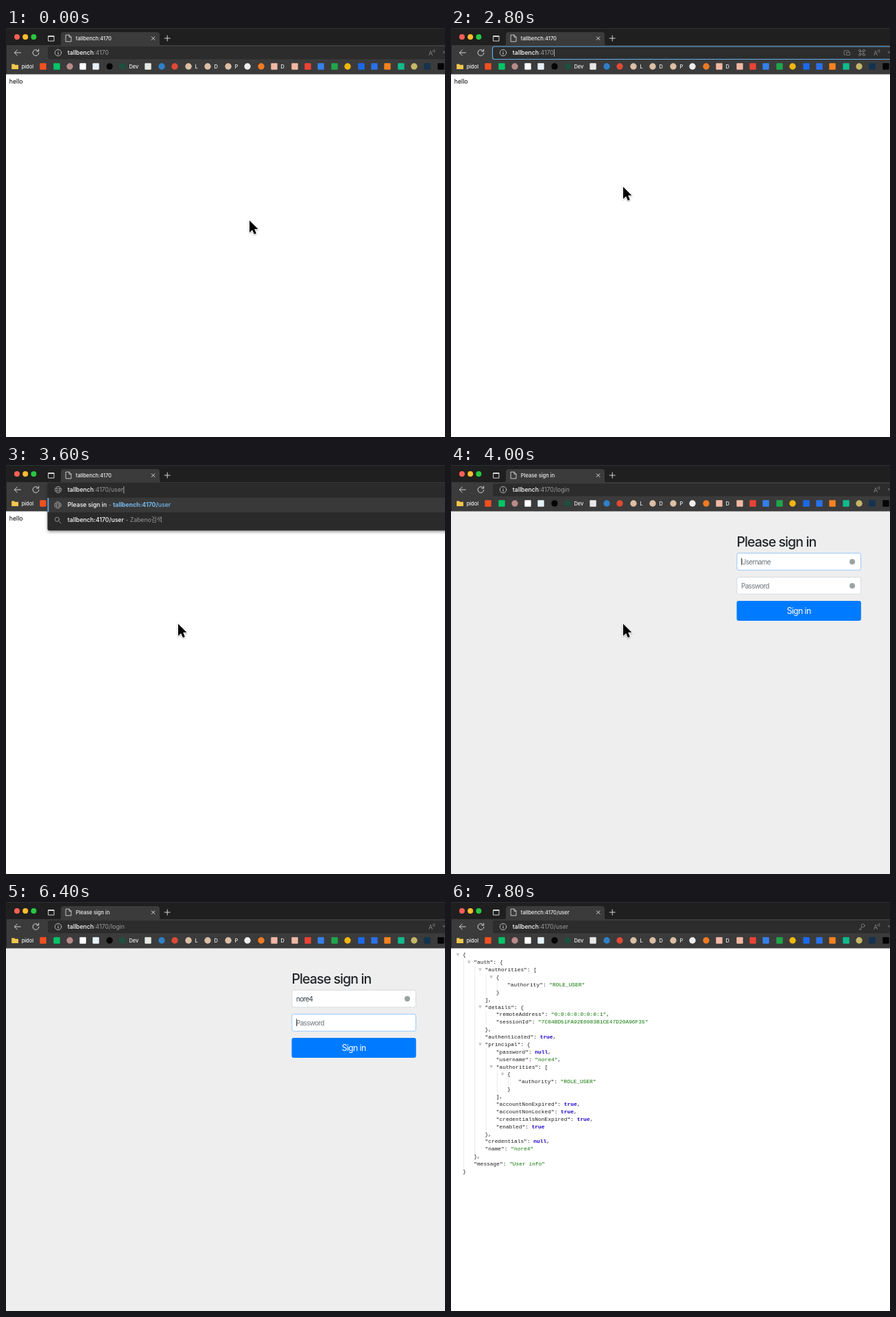
An HTML page for the animation above (8000 ms loop, 640 by 596 pixels).

```html
<!DOCTYPE html>
<html lang="en">
<head>
<meta charset="utf-8">
<title>Sign-in flow</title>
<style>
  html, body { margin: 0; width: 100%; height: 100%; overflow: hidden; background: #fff; }
  svg { display: block; width: 640px; height: 596px; font-family: Inter, "Noto Sans CJK KR", "Noto Sans CJK", sans-serif; }
  .line { fill: none; stroke: #d6d6d6; stroke-width: 1; stroke-linecap: round; stroke-linejoin: round; }
  .dim { stroke: #858585; stroke-width: .8; }
  .tab { font-size: 7.5px; font-weight: 500; fill: #f0f0f0; }
  .mark { font-size: 7.4px; font-weight: 500; fill: #f2f2f2; }
  .url { font-size: 8.7px; fill: #9c9c9c; }
  .url .host, .row { fill: #fff; }
  .url .host { font-weight: 500; }
  .row { font-size: 8.7px; font-weight: 500; }
  .row .dash { fill: #9a9a9a; font-weight: 400; }
  .row .link { fill: #76b9ed; }
  .row .b { font-weight: 700; }
  .form { letter-spacing: -.04em; }
  .field { font-size: 9.9px; fill: #343a40; }
  .field.empty { fill: #6c757d; }
  .box { fill: #fff; stroke: #ced4da; stroke-width: .8; }
  .json { font: 7.86px "Liberation Mono", monospace; fill: #1c1c1c; }
  .json .str { fill: #0b7500; }
  .json .key { fill: #1a01cc; font-weight: 700; }
  .guide { stroke: #c4c4c4; stroke-width: .7; stroke-dasharray: 1 1; }
</style>
</head>
<body>
<svg viewBox="0 0 640 596">
  <defs>
    <g id="globe" class="line" style="stroke:#a0a0a0;stroke-width:.75">
      <circle r="4.7"/><ellipse rx="2.1" ry="4.7"/><path d="M-4.4-1.6H4.4M-4.4 1.6H4.4"/>
    </g>
    <g id="lens" class="line" style="stroke:#a0a0a0;stroke-width:.9">
      <circle cx="-1" cy="-1" r="3.1"/><path d="M1.3 1.3L4.6 4.6"/>
    </g>
    <filter id="soft" x="-5%" y="-10%" width="110%" height="130%">
      <feDropShadow dx="0" dy="2" stdDeviation="2" flood-opacity=".4"/>
    </filter>
    <filter id="lift" x="-50%" y="-50%" width="200%" height="200%">
      <feDropShadow dx="0" dy="1" stdDeviation="1" flood-opacity=".35"/>
    </filter>
  </defs>

  <!-- pages -->
  <rect width="640" height="596" fill="#fff"/>
  <text data-on="0-4000" x="4.7" y="80.5" font-size="8.8">hello</text>

  <g class="form" data-on="4000-7600">
    <rect y="67" width="640" height="529" fill="#eee"/>
    <text x="416.5" y="119" font-size="19.5" font-weight="500" fill="#212529" letter-spacing="-.9">Please sign in</text>
    <rect id="nameBox" class="box" x="416.9" y="128.4" width="180.6" height="24.8" rx="2.5"/>
    <rect id="passBox" class="box" x="416.9" y="163.4" width="180.6" height="24.8" rx="2.5"/>
    <text id="name" class="field" x="423" y="144.6"></text>
    <text id="pass" class="field" x="423" y="179.5"></text>
    <circle cx="585" cy="141" r="4" fill="#9aa3a3"/>
    <circle data-on="4000-6200" cx="585" cy="176" r="4" fill="#9aa3a3"/>
    <rect x="416.5" y="198" width="181.3" height="29" rx="3" fill="#007bff"/>
    <text x="507" y="217" font-size="12.4" fill="#fff" text-anchor="middle">Sign in</text>
    <rect id="fieldCaret" width=".7" height="11" fill="#222"/>
  </g>

  <g id="json" class="json" data-on="7600-8000"></g>

  <!-- browser frame -->
  <rect width="640" height="26" fill="#1f1f1f"/>
  <rect width="640" height="1" fill="#2a2f35"/>
  <rect y="25" width="640" height="42.5" fill="#3b3b3b"/>
  <rect width="1" height="67" fill="#242424"/>
  <path d="M77 25.5Q80 25.5 80 22V10Q80 6 84 6H220Q224 6 224 10V22Q224 25.5 227 25.5Z" fill="#3b3b3b"/>
  <circle cx="16" cy="13" r="4" fill="#fe5f57"/>
  <circle cx="28.2" cy="13" r="4" fill="#febc2e"/>
  <circle cx="40.4" cy="13" r="4" fill="#28c840"/>
  <path class="line" d="M62 11.5H70V19H62ZM62 12.5H70"/>
  <path id="page" class="line" style="stroke-width:.9" d="M87.5 10.2H92L95 13.2V19.8H87.5ZM92 10.2V13.2H95"/>
  <path id="spin" class="line" style="stroke:#6cb4f0;stroke-width:1.2" d="M0-4A4 4 0 1 1-4 0"/>
  <text id="title" class="tab" x="101.8" y="17.6"></text>
  <path class="line" d="M212.3 12.8L216.9 17.4M216.9 12.8L212.3 17.4M231.2 15H239.2M235.2 11V19"/>
  <path class="line" d="M21.3 36H12.5M16.3 32L12.3 36L16.3 40"/>
  <path id="reload" class="line" d="M47.2 33.6A4.4 4.4 0 1 0 47.9 36.4M47.7 31V34H44.7"/>
  <path id="stop" class="line" d="M40 32.5L47 39.5M47 32.5L40 39.5"/>
  <g id="marks" class="mark"></g>

  <!-- address bar -->
  <rect x="61" y="27" width="590" height="18.5" rx="3" fill="#2c2c2c"/>
  <rect data-on="2200-3000" x="60.5" y="27" width="590" height="18.5" rx="3" fill="none" stroke="#62a9e6" stroke-width="1.2"/>
  <g id="drop" data-on="3000-3800"></g>
  <g data-on="0-3000 3800-8000">
    <circle class="line" style="stroke-width:.8" cx="76" cy="36" r="4.7"/>
    <path class="line" d="M76 35.6V38.4M76 33.6V33.7"/>
    <text x="616" y="39.5" font-size="9" fill="#858585">A</text>
    <path class="line dim" d="M622.5 32.2Q623.5 33.5 622.5 34.8M624.3 31.2Q626 33.5 624.3 35.8M637.5 35L640 34.7M639 37L637.5 35"/>
  </g>
  <g data-on="2200-3000" class="line dim">
    <path d="M603 39H601V33H608V34.5M605 35.5H609.5V39.5H605Z" transform="translate(-28)"/>
    <path d="M597 34H601V38H597Z"/>
    <circle cx="596" cy="33" r="1.6"/><circle cx="602" cy="33" r="1.6"/>
    <circle cx="596" cy="39" r="1.6"/><circle cx="602" cy="39" r="1.6"/>
  </g>
  <g data-on="6600-8000" class="line dim">
    <circle cx="600.6" cy="34.4" r="2.4"/><path d="M598.9 36.2L595.4 39.6V40.6H597.4V39.2H598.6"/>
  </g>
  <rect data-on="2200-2800" x="89.5" y="31" width="61" height="10.5" fill="#2f66a5"/>
  <text class="url" id="url" x="89.8" y="39.2"><tspan class="host"></tspan><tspan class="rest"></tspan></text>
  <rect id="urlCaret" data-on="2800-3800" y="31" width=".7" height="10.5" fill="#ddd"/>

  <path id="cursor" filter="url(#lift)" d="M0 0V17.4L4.1 13.8L6.9 19.9L9.8 18.7L7.2 12.6H12.5Z"
    stroke="#fff" stroke-width="1.4" paint-order="stroke"/>
</svg>

<script>
const LOOP = 8000, STEP = 200;
const HOST = 'tallbench', PORT = ':4170', SITE = HOST + PORT, USER = 'nore4';
const $ = id => document.getElementById(id);

// Bookmarks: centre x, colour, round or not, label
const marks = [
  [54, '#f25022'], [74, '#05c468'], [93, '#b98a8a', 1], [112, '#fff'], [131, '#e4f1f6'], [151, '#050505', 1],
  [170, '#1d5040', 1, 'Dev'], [207, '#e6e8e6'], [227, '#2f80c8', 1], [246, '#df4a35', 1],
  [266, '#dcbfa5', 1, 'L'], [294, '#dcbfa5', 1, 'D'], [324, '#dcbfa5', 1, 'P'], [352, '#eee', 1],
  [372, '#f07a24', 1], [391, '#f0b8a4', 0, 'D'], [421, '#f0b8a4'], [440, '#ea4335'], [459, '#3580ea'],
  [479, '#1fa64a'], [498, '#f2b70c', 1], [518, '#1c69ea'], [537, '#2a70e8'], [556, '#f58220'],
  [576, '#10bb8c'], [595, '#c4b768', 1], [614, '#13334f'], [634, '#050505']
];
$('marks').innerHTML =
  '<path d="M8.2 52.5H12L13.2 53.8H18V60H8.2Z" fill="#f3c64c"/><text x="22.7" y="58.7">pidol</text>' +
  marks.map(([x, fill, round, label]) =>
    `<rect x="${x - 4.7}" y="51.3" width="9.4" height="9.4" rx="${round ? 4.7 : 1}" fill="${fill}"/>` +
    (label ? `<text x="${x + 9.5}" y="58.7">${label}</text>` : '')).join('');

// Address suggestions
const dash = '<tspan class="dash"> - </tspan>';
const bold = s => `<tspan class="b">${s}</tspan>`;
const link = (strong, rest = '') => `<tspan class="link">${bold(strong)}${rest}</tspan>`;
const search = path => ['lens', `${SITE}${path}<tspan class="dash"> - Zabeno검색</tspan>`];
const sign = path => ['globe', 'Please sign in' + dash + link(SITE + '/', path)];

function panel(on, rows) {
  const h = rows.length * 21.8 + 26;
  return `<g data-on="${on}">
    <rect x="60.5" y="26" width="600" height="${h}" rx="3" fill="#2b2b2b" filter="url(#soft)"/>
    <rect x="60.5" y="47.5" width="580" height="21.5" fill="#393939"/>
    <rect x="60.5" y="48" width="1.8" height="20.5" fill="#62a9e6"/>
    <use href="#globe" x="76" y="36"/>` +
    rows.map(([icon, text], i) => {
      const y = 58.4 + i * 21.8;
      return `<use href="#${icon}" x="75.5" y="${y}"/><text class="row" x="89.8" y="${y + 3}">${text}</text>`;
    }).join('') + '</g>';
}
$('drop').innerHTML =
  panel('3000-3400', [
    ['globe', bold(SITE) + dash + link(SITE)],
    search('/'),
    sign('user'),
    ['globe', bold(HOST) + dash + link(SITE + '/', 'admin')],
    sign('auth')
  ]) +
  panel('3400-3600', [sign('user'), search('/u')]) +
  panel('3600-3800', [sign('user'), search('/user')]);

// Response viewer, one leading space per level
const body = `{
 "auth": {
  "authorities": [
   {
    "authority": "ROLE_USER"
   }
  ],
  "details": {
   "remoteAddress": "0:0:0:0:0:0:0:1",
   "sessionId": "7C04BD51FA92E6083B1CE47D20A96F35"
  },
  "authenticated": true,
  "principal": {
   "password": null,
   "username": "${USER}",
   "authorities": [
    {
     "authority": "ROLE_USER"
    }
   ],
   "accountNonExpired": true,
   "accountNonLocked": true,
   "credentialsNonExpired": true,
   "enabled": true
  },
  "credentials": null,
  "name": "${USER}"
 },
 "message": "User info"
}`;

function viewer(src) {
  const open = [];
  let out = '<rect y="67" width="640" height="529" fill="#fff"/>';
  src.split('\n').forEach((raw, i) => {
    const text = raw.trimStart();
    const x = 17 + (raw.length - text.length) * 16.25;
    const y = 77 + i * 10.88;
    if (/^[}\]]/.test(text))
      out += `<path class="guide" d="M${x + 1.5} ${open.pop() + 6}V${y - 5}"/>`;
    if (/[{[]$/.test(text)) {
      open.push(y);
      out += `<path d="M${x - 9.5} ${y - 2.3}h5l-2.5 4.6z" fill="#c6c6c6"/>`;
    }
    const code = text
      .replace(/(: )(".*")/, '$1<tspan class="str">$2</tspan>')
      .replace(/(: )(true|null)/, '$1<tspan class="key">$2</tspan>');
    out += `<text x="${x}" y="${y + 2.4}">${code}</text>`;
  });
  return out;
}
$('json').innerHTML = viewer(body);

// Value of the last entry that has started
const at = (track, t) => track.filter(([start]) => start <= t).pop()[1];

const path = [[0, ''], [3000, '/'], [3400, '/u'], [3600, '/user'], [4000, '/login'], [7600, '/user']];
const title = [[0, SITE], [4000, 'Please sign in'], [7600, SITE + '/user']];
const typedName = [[0, 0], [5000, 1], [5200, 2], [5400, 4], [5600, 5]];
const typedPass = [[0, 0], [6600, 1], [6800, 3], [7000, 4]];
const pointer = [[0, [355, 280.5]], [200, [288, 248]], [400, [251, 231.5]]];

const timed = [...document.querySelectorAll('[data-on]')].map(el => ({
  el, spans: el.dataset.on.split(' ').map(s => s.split('-').map(Number))
}));
const within = (spans, t) => spans.some(([a, b]) => t >= a && t < b);
const show = (el, on) => { el.style.display = on ? '' : 'none'; };
const busy = [[800, 1200], [3800, 4000], [7200, 7600]];
const [host, rest] = $('url').children;
host.textContent = HOST;

function setField(el, value, hint) {
  el.textContent = value || hint;
  el.classList.toggle('empty', !value);
}

function draw(t) {
  timed.forEach(({ el, spans }) => show(el, within(spans, t)));

  const loading = within(busy, t);
  show($('spin'), loading);
  show($('stop'), loading);
  show($('page'), !loading);
  show($('reload'), !loading);
  $('spin').setAttribute('transform', `translate(91 15) rotate(${t / STEP * 100})`);

  $('title').textContent = at(title, t);
  rest.textContent = PORT + at(path, t);
  $('urlCaret').setAttribute('x', 90.3 + $('url').getComputedTextLength());

  const name = USER.slice(0, at(typedName, t));
  const pass = '•'.repeat(at(typedPass, t));
  setField($('name'), name, 'Username');
  setField($('pass'), pass, 'Password');

  const onPass = t >= 6000;
  $('nameBox').style.stroke = onPass ? '' : '#80bdff';
  $('passBox').style.stroke = onPass ? '#80bdff' : '';
  const value = onPass ? pass : name;
  const width = value && t < 7600 ? $(onPass ? 'pass' : 'name').getComputedTextLength() : 0;
  $('fieldCaret').setAttribute('x', 423 + width);
  $('fieldCaret').setAttribute('y', onPass ? 170 : 135.2);

  show($('cursor'), t < 5000);
  $('cursor').setAttribute('transform', `translate(${at(pointer, t)})`);
}

let last = -1;
function tick() {
  const t = Math.floor(performance.now() % LOOP / STEP) * STEP;
  if (t !== last) draw(last = t);
  requestAnimationFrame(tick);
}
tick();
</script>
</body>
</html>
```
